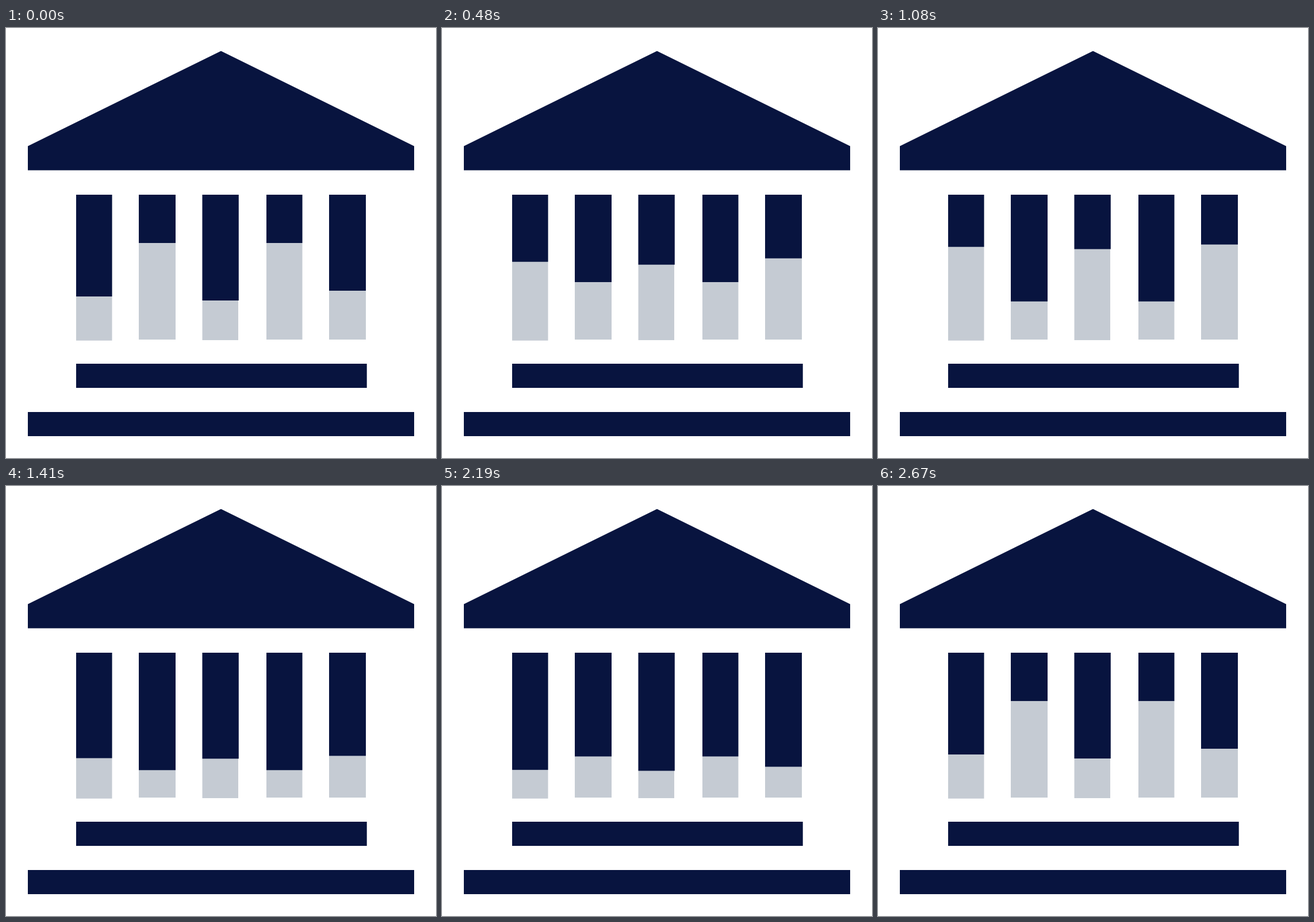
These frames come from a looping animation (748x748 px, 2.7 s). An HTML page:

```html
<!DOCTYPE html>
<html lang="en">
<head>
<meta charset="utf-8">
<title>Bank columns</title>
<style>
  html, body { margin: 0; width: 100%; height: 100%; overflow: hidden; background: #fff; }
  svg { display: block; width: 100vw; height: 100vh; fill: #08143f; }
  .back { fill: #c5cbd3; }

  /* --a, --b, --c: the three heights each column eases between */
  .bar {
    height: var(--a);
    animation: slide 2.7s cubic-bezier(.833, 0, .167, 1) infinite;
  }
  .c1 { --a: 177px; --b: 87.5px; --c: 212px; }
  .c2 { --a: 84px; --b: 185px; --c: 210px; }
  .c3 { --a: 184px; --b: 91.5px; --c: 212px; }
  .c5 { --a: 167px; --b: 83.4px; --c: 208px; }

  @keyframes slide {
    0%, 100% { height: var(--a); }
    33.3333% { height: var(--b); }
    66.6667% { height: var(--c); }
  }
</style>
</head>
<body>
<svg viewBox="0 0 748 748">
  <path d="M374 40 710 205.5V247.5H38V205.5Z"/>

  <g class="back">
    <rect x="122" y="290" width="62.5" height="253.7"/>
    <rect x="231" y="290" width="64" height="252"/>
    <rect x="341.5" y="290" width="62.5" height="253"/>
    <rect x="453" y="290" width="62.5" height="252"/>
    <rect x="562" y="290" width="64" height="252"/>
  </g>

  <rect class="bar c1" x="122" y="290" width="62.5"/>
  <rect class="bar c2" x="231" y="290" width="64"/>
  <rect class="bar c3" x="341.5" y="290" width="63.3"/>
  <rect class="bar c2" x="453" y="290" width="62.5"/>
  <rect class="bar c5" x="562" y="290" width="64"/>

  <rect x="122" y="584" width="505.7" height="42"/>
  <rect x="38" y="668" width="672" height="42"/>
</svg>
</body>
</html>
```
